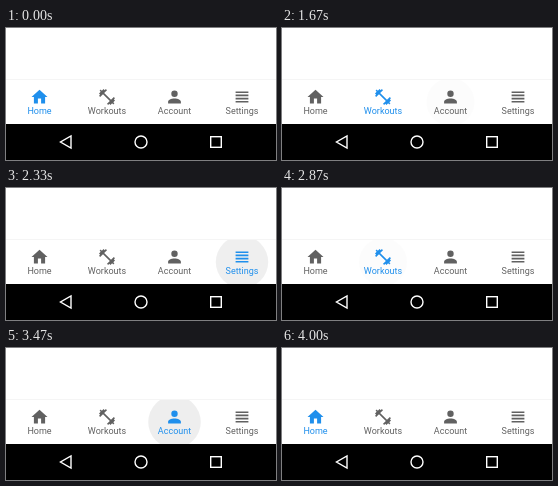
These frames come from a looping animation (270x132 px, 4.14 s). An HTML page:

```html
<!DOCTYPE html>
<html lang="en">
<head>
<meta charset="utf-8">
<title>Bottom navigation</title>
<style>
  html, body { margin: 0; height: 100%; overflow: hidden; background: #fff; }
  svg { display: block; width: 100vw; height: 100vh; }
  text { font: 9px Roboto, sans-serif; text-anchor: middle; }
  .tab { fill: #616161; }
  .tab.active { fill: #1f8fec; }
  .system { fill: none; stroke: #fff; stroke-width: 1.4; }
</style>
</head>
<body>
<svg viewBox="0 0 270 132">
  <clipPath id="bar"><rect y="52" width="270" height="44"/></clipPath>
  <rect y="51" width="270" height="1" fill="#f5f5f5"/>
  <g id="ripples" clip-path="url(#bar)"></g>
  <g id="tabs"></g>
  <rect y="96" width="270" height="36"/>
  <g class="system">
    <path d="M65 108v12l-10.5-6z"/>
    <circle cx="135" cy="114" r="6"/>
    <rect x="204.7" y="108.7" width="10.6" height="10.6"/>
  </g>
</svg>
<script>
const LOOP = 4140, STEP = 1000 / 15;
const RISE = 67, RADIUS = 26.3, OPACITY = 0.066;

const TABS = [
  ['Home', 'M10 20v-6h4v6h5v-8h3L12 3 2 12h3v8z'],
  ['Workouts', 'M20.57 14.86L22 13.43 20.57 12 17 15.57 8.43 7 12 3.43 10.57 2 9.14 3.43 7.71 2 5.57 4.14 4.14 2.71 2.71 4.14l1.43 1.43L2 7.71l1.43 1.43L2 10.57 3.43 12 7 8.43 15.57 17 12 20.57 13.43 22l1.43-1.43L16.29 22l2.14-2.14 1.43 1.43 1.43-1.43-1.43-1.43L22 16.29z'],
  ['Account', 'M12 4a4 4 0 0 1 0 8a4 4 0 0 1 0-8m0 10c4.42 0 8 1.79 8 4v2H4v-2c0-2.21 3.58-4 8-4'],
  ['Settings', 'M4 5h16v2H4zm0 4h16v2H4zm0 4h16v2H4zm0 4h16v2H4z']
];

// Times in ms: touch starts the ripple, select recolours, release to end fades
const PRESSES = [
  { tab: 1, touch: 880, select: 925, release: 1130, end: 1330 },
  { tab: 2, touch: 1654, select: 1700, release: 1820, end: 2000 },
  { tab: 3, touch: 2268, select: 2325, release: 2380, end: 2600 },
  { tab: 1, touch: 2854, select: 2860, release: 3110, end: 3330 },
  { tab: 2, touch: 3387, select: 3395, release: 3600, end: 3800 },
  { tab: 0, touch: 3840, select: 3860, release: 3880, end: 4000 }
];

const clamp = v => Math.min(1, Math.max(0, v));

function add(parent, tag, attrs) {
  const node = document.createElementNS('http://www.w3.org/2000/svg', tag);
  for (const key in attrs) node.setAttribute(key, attrs[key]);
  return parent.appendChild(node);
}

const tabLayer = document.getElementById('tabs');
const rippleLayer = document.getElementById('ripples');
const views = TABS.map(([label, icon], i) => {
  const x = 33.5 + 67.5 * i;
  const tab = add(tabLayer, 'g', { class: 'tab' });
  add(tab, 'path', { d: icon, transform: `translate(${x - 9.6} 59.4) scale(.8)` });
  add(tab, 'text', { x, y: 86 }).textContent = label;
  return { tab, ripple: add(rippleLayer, 'circle', { cx: x, cy: 74 }) };
});

function draw(now) {
  const frame = Math.floor((now % LOOP + 4) / STEP);
  const t = frame * STEP;
  let active = 0;
  const ripples = TABS.map(() => ({ grow: 0, alpha: 0 }));
  for (const { tab, touch, select, release, end } of PRESSES) {
    if (t >= select) active = tab;
    if (t < touch || t >= end) continue;
    const grow = clamp((t - touch) / RISE);
    const fade = clamp((end - t) / (end - release));
    ripples[tab] = { grow, alpha: OPACITY * grow * fade };
  }
  views.forEach(({ tab, ripple }, i) => {
    tab.classList.toggle('active', i === active);
    ripple.setAttribute('r', RADIUS * (0.9 + 0.1 * ripples[i].grow));
    ripple.setAttribute('fill-opacity', ripples[i].alpha);
  });
}

const start = performance.now();
function tick() {
  draw(performance.now() - start);
  requestAnimationFrame(tick);
}
tick();
</script>
</body>
</html>
```
